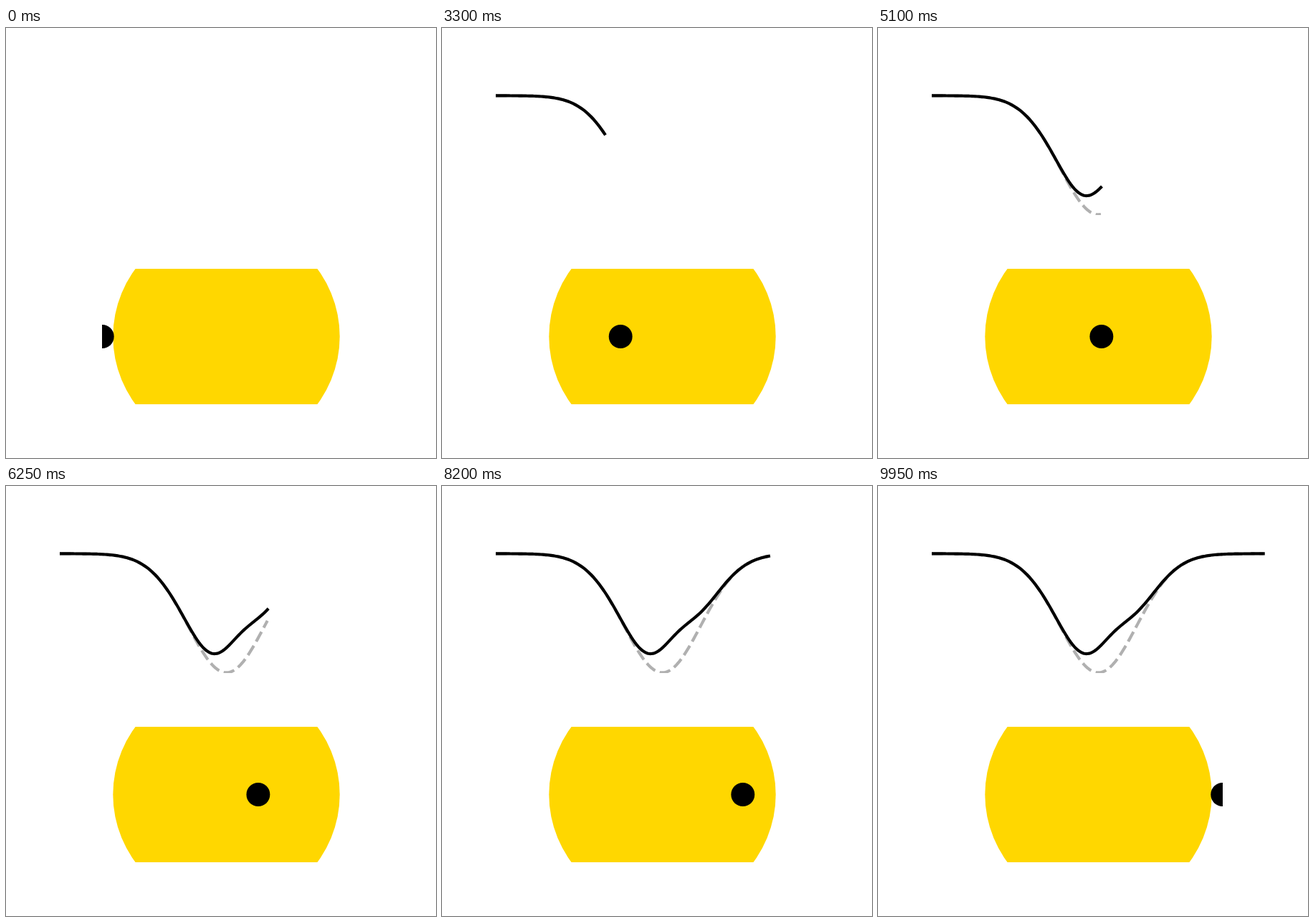
Write an HTML page with a canvas that moves like this. It is 600x600 px and loops after 10 s.

```html
<!DOCTYPE html>
<html lang="en">
<head>
<meta charset="utf-8">
<title>Transit light curve</title>
<style>
  html, body { margin: 0; width: 100%; height: 100%; overflow: hidden; background: #fff; }
  canvas { display: block; }
</style>
</head>
<body>
<canvas id="stage" width="600" height="600"></canvas>
<script>
const ctx = document.getElementById('stage').getContext('2d');
const STEPS = 200, STEP_MS = 50, LINE = 25 / 6;
const chart = { x: 75, y: 72, w: 465, h: 189 };
const sky = { x: 134, y: 336, w: 347, h: 189 };

const bell = (x, center, spread) => Math.exp(-((x - center) ** 2) / spread);
const plainDip = x => 94.4 + 166 * bell(x, 307.5, 5720);
const spottedDip = x => plainDip(x) - 44 * bell(x, 326.1, 1430);

function clipped(box, draw) {
  ctx.save();
  ctx.beginPath();
  ctx.rect(box.x, box.y, box.w, box.h);
  ctx.clip();
  draw();
  ctx.restore();
}

function curve(fn, count, color, cap, dash) {
  if (count < 2) return;
  ctx.beginPath();
  for (let i = 0; i < count; i++) {
    const x = chart.x + chart.w * i / (STEPS - 1);
    ctx.lineTo(x, fn(x));
  }
  ctx.lineWidth = LINE;
  ctx.lineJoin = 'round';
  ctx.lineCap = cap;
  ctx.setLineDash(dash);
  ctx.strokeStyle = color;
  ctx.stroke();
}

function disc(x, radius, color) {
  ctx.beginPath();
  ctx.arc(x, 430.5, radius, 0, 2 * Math.PI);
  ctx.fillStyle = color;
  ctx.fill();
}

function render(step) {
  ctx.fillStyle = '#fff';
  ctx.fillRect(0, 0, 600, 600);
  clipped(chart, () => {
    curve(plainDip, step, '#b0b0b0', 'butt', [3.7 * LINE, 1.6 * LINE]);
    curve(spottedDip, step, '#000', 'square', []);
  });
  clipped(sky, () => {
    disc(307.5, 158.2, '#ffd700');
    disc(134.25 + 346.5 * step / (STEPS - 1), 16.45, '#000');
  });
}

const start = performance.now();
function tick() {
  const elapsed = performance.now() - start;
  render(Math.floor(elapsed / STEP_MS) % STEPS);
  requestAnimationFrame(tick);
}
tick();
</script>
</body>
</html>
```
